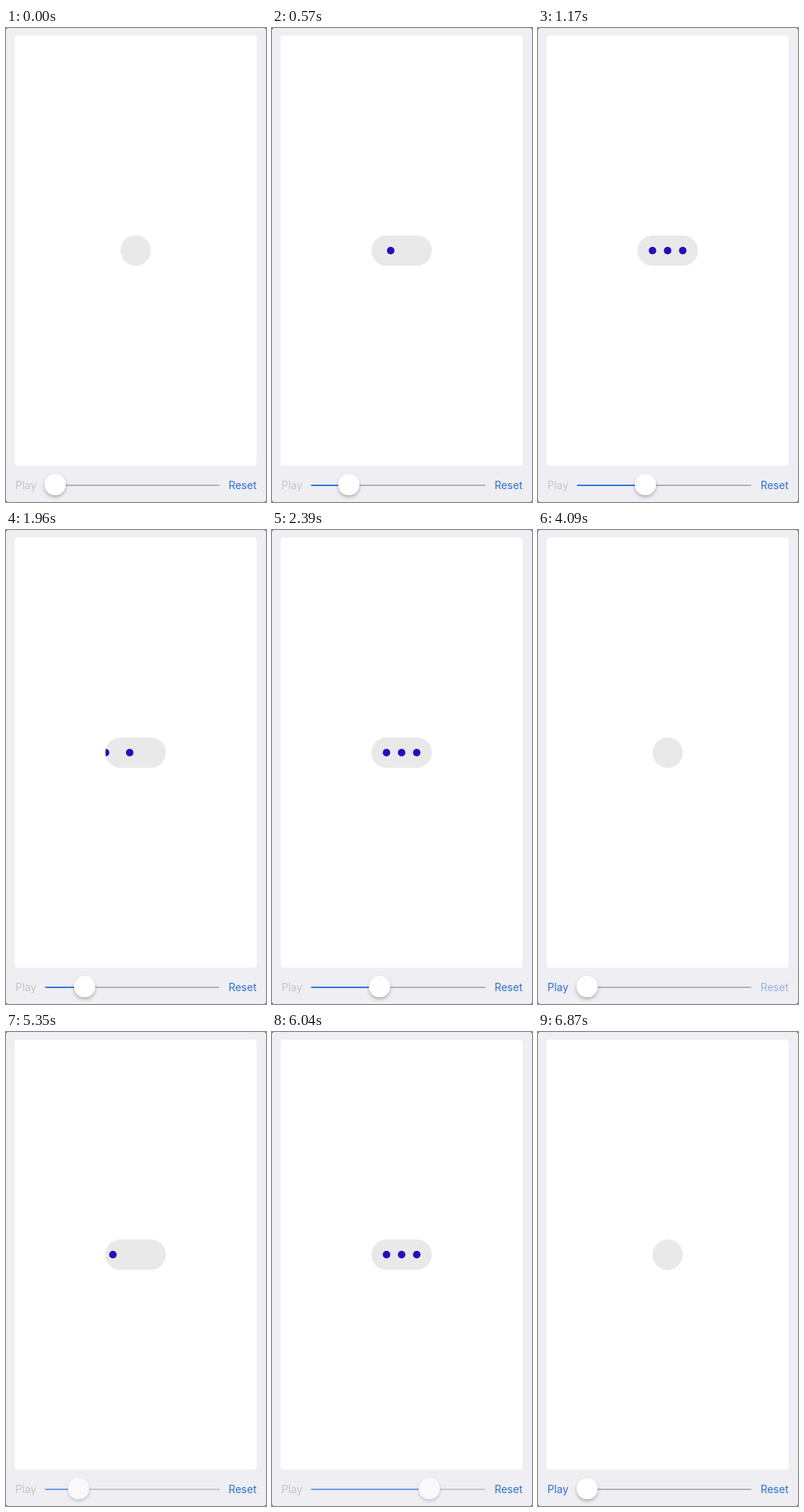
An HTML page for the animation above (7040 ms loop, 344 px wide and 626 px high).

```html
<!DOCTYPE html>
<html lang="en">
<head>
<meta charset="utf-8">
<title>Scrubbable loader</title>
<style>
  html, body { margin: 0; width: 100%; height: 100%; overflow: hidden; background: #55555a; }
  svg { display: block; width: 344px; height: 626px; }
  text { font: 14px Inter, Roboto, sans-serif; }
</style>
</head>
<body>
<svg viewBox="0 0 344 626">
  <defs>
    <clipPath id="pillClip"><rect class="pill" y="274" height="40" rx="20"/></clipPath>
    <filter id="shadow" x="-50%" y="-50%" width="200%" height="200%">
      <feDropShadow dx="0" dy="2.5" stdDeviation="2.2" flood-opacity=".28"/>
    </filter>
  </defs>
  <rect width="344" height="626" rx="3" fill="#eeeef3"/>
  <rect x="11.5" y="10" width="320" height="568" rx="4" fill="#fff"/>
  <rect class="pill" y="274" height="40" rx="20" fill="#e9e9e9"/>
  <g clip-path="url(#pillClip)" fill="#2c0ab8">
    <circle class="dot" cy="294" r="5"/>
    <circle class="dot" cy="294" r="5"/>
    <circle class="dot" cy="294" r="5"/>
  </g>
  <text id="play" x="12.5" y="608.5">Play</text>
  <text id="reset" x="331.5" y="608.5" text-anchor="end" fill="#2f70cf">Reset</text>
  <g id="slider">
    <rect x="51.5" y="603" width="231" height="2" rx="1" fill="#b4b3b9"/>
    <rect id="fill" x="51.5" y="603" height="2" rx="1" fill="#3878d8"/>
    <circle id="thumb" cy="603" r="14" fill="#fff" filter="url(#shadow)"/>
  </g>
</svg>
<script>
  const LOOP = 7040, MIN_X = 65, MAX_X = 268;
  const PLAY_START = 5160, PLAY_END = 6410;
  const RESET_TIME = 3680, READY_TIME = 6600;

  const $ = id => document.getElementById(id);
  const pills = document.querySelectorAll('.pill');
  const dots = document.querySelectorAll('.dot');
  const ramp = (v, from, to) => Math.min(1, Math.max(0, (v - from) / (to - from)));
  const ease = v => v * v * (3 - 2 * v);

  // Linear interpolation through [time, value] points
  function follow(t, points) {
    let [t0, v0] = points[0];
    for (const [t1, v1] of points) {
      if (t < t1) return t1 === t0 ? v0 : v0 + (v1 - v0) * ramp(t, t0, t1);
      [t0, v0] = [t1, v1];
    }
    return v0;
  }

  const scrub = [
    [40, 65], [780, 116], [1170, 142], [1450, 160], [1530, 158], [1960, 104],
    [2030, 102], [2260, 122], [2570, 170], [2830, 223], [2960, 259], [3090, 268]
  ];
  const playAlpha = [[4780, 1], [4860, .45], [5030, .45], [5130, 1]];
  const resetAlpha = [[3640, 1], [3680, .3], [3900, .35], [4090, .45], [4420, 1]];
  const sliderAlpha = [[5130, 1], [5200, .65], [6410, .65], [6560, 1]];

  function sliderX(t) {
    if (t < RESET_TIME) return follow(t, scrub);
    if (t < PLAY_START) return MAX_X + (MIN_X - MAX_X) * ease(ramp(t, RESET_TIME, 3980));
    if (t < PLAY_END) return MIN_X + (MAX_X - MIN_X) * ramp(t, PLAY_START, PLAY_END);
    return MAX_X + (MIN_X - MAX_X) * ease(ramp(t, 6560, 6850));
  }

  function drawLoader(p) {
    const width = 40 + 40 * (ramp(p, 0, .1) - ramp(p, .9, 1));
    pills.forEach(pill => {
      pill.setAttribute('x', 171.5 - width / 2);
      pill.setAttribute('width', width);
    });
    dots.forEach((dot, i) => {
      const delay = (2 - i) * .021;
      const enter = ramp(p, .1 + delay, .241 + delay);
      const leave = ramp(p, .79 + delay, .93 + delay);
      dot.setAttribute('cx', 151.5 + 20 * i + 80 * (enter - 1 + leave));
    });
  }

  function draw(t) {
    const x = sliderX(t);
    const returning = t >= RESET_TIME && t < PLAY_START || t >= PLAY_END;
    drawLoader(returning ? 0 : (x - MIN_X) / (MAX_X - MIN_X));

    $('thumb').setAttribute('cx', x);
    $('fill').setAttribute('width', x - 51.5);
    $('slider').setAttribute('opacity', follow(t, sliderAlpha));

    const enabled = t >= RESET_TIME && t < 5130 || t >= READY_TIME;
    $('play').setAttribute('fill', enabled ? '#2f70cf' : '#c5c5ca');
    $('play').setAttribute('opacity', follow(t, playAlpha));
    $('reset').setAttribute('opacity', follow(t, resetAlpha));
  }

  const start = performance.now();
  function tick() {
    draw((performance.now() - start) % LOOP);
    requestAnimationFrame(tick);
  }
  tick();
</script>
</body>
</html>
```
